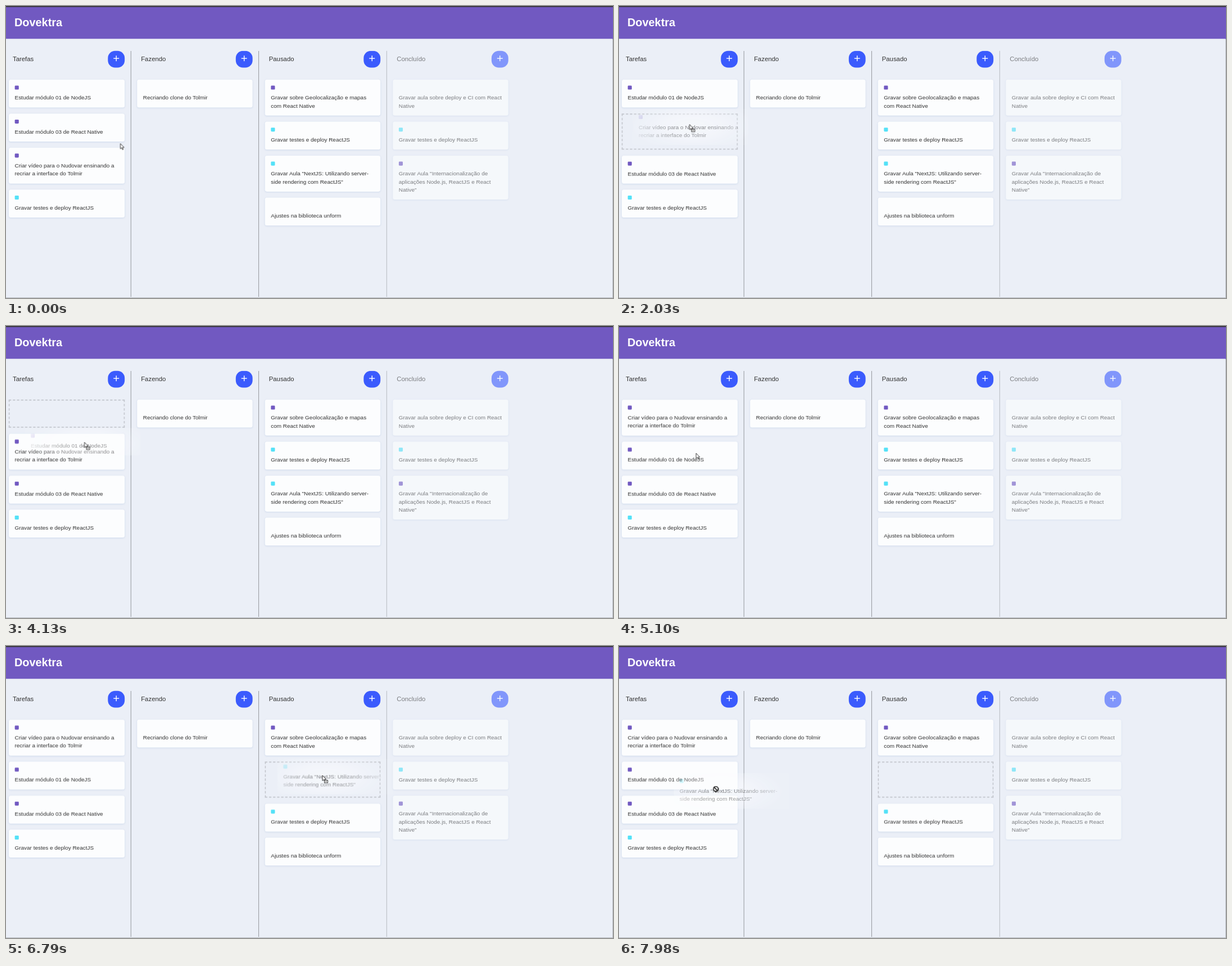
An HTML page for the animation above (8000 ms loop, 1080x519 px).

```html
<!DOCTYPE html>
<html lang="pt-BR">
<head>
<meta charset="utf-8">
<title>Quadro de tarefas</title>
<style>
  * { box-sizing: border-box; margin: 0; }
  html, body { width: 100%; height: 100%; overflow: hidden; background: #ebeff7; }
  body { position: relative; font-family: "Liberation Sans", Arial, sans-serif; color: #333; }

  /* The board is laid out at full size and shown at 71.1% */
  .board { position: absolute; left: 0; top: .3px; width: 1519px; height: 730px;
    transform: scale(.711); transform-origin: 0 0; }
  header { position: absolute; top: -1px; width: 100%; height: 83px; padding-left: 21px;
    background: #7159c1; color: #fff; font: bold 28px/85px "Liberation Sans", Arial, sans-serif; }
  .edge { position: absolute; inset: 0; border: solid #b4b8be; border-width: 0 1px 1px 0; }
  .edge::before { content: ""; position: absolute; left: 0; right: -1px; top: 0; height: 1.5px; background: #3d3a45; }
  .edge::after { content: ""; position: absolute; right: -1px; top: 1.5px; width: 1px; height: 57px; background: #7159c1; }

  .col { position: absolute; left: calc(-8.2px + 320px * var(--n)); top: 112px; width: 320px; height: 615px; padding: 0 15px; }
  .col + .col { border-left: 1px solid rgba(0, 0, 0, .52); }
  .done { opacity: .6; }
  h2 { height: 42px; margin-bottom: 30px; padding-left: 10px; font-size: 16px; font-weight: 400; line-height: 41px; position: relative; }
  .add { position: absolute; right: 0; top: 0; width: 42px; height: 42px; border-radius: 18px; background: #3b5bfd; }
  .add::before, .add::after { content: ""; position: absolute; background: #fff; left: 14px; top: 18px; width: 14px; height: 2px; }
  .add::after { transform: rotate(90deg); }

  .card { position: relative; margin-bottom: 15px; }
  .face { padding: 15px; border-radius: 5px; background: #fcfdfe; box-shadow: 0 1px 4px rgba(192, 208, 230, .8); }
  .face i { display: block; width: 10px; height: 10px; margin-bottom: 10px; border-radius: 2px; }
  .face p { font-size: 14px; line-height: 20px; white-space: nowrap; }
  .purple { background: #7159c1; }
  .cyan { background: #54e1f7; }
  .slot { position: absolute; inset: 0; border: 2px dashed rgba(0, 0, 0, .2); }

  #pointer { position: absolute; left: 0; top: 0; animation: move 8s linear infinite; }
  #pointer svg { position: absolute; left: 0; top: 0; overflow: visible; }
  .ghost { position: absolute; left: 0; top: 0; width: 290px; transform-origin: 0 0;
    transform: scale(.711) translate(calc(-1 * var(--x)), calc(-1 * var(--y))); }
  .ghost .face { box-shadow: none;
    mask-image: radial-gradient(155px 62px at calc(var(--x) + 14px) calc(var(--y) + 10px),
      rgba(0, 0, 0, .62), rgba(0, 0, 0, .42) 50%, rgba(0, 0, 0, .08)); }

  .slot, .ghost, .lift .face, .shift, .arrow, .drop, .stop { animation: 8s step-end infinite; }
  .a .slot, .ghost.a { animation-name: holdA; }
  .b .slot, .ghost.b { animation-name: holdB; }
  .c .slot, .ghost.c { animation-name: holdC; }
  .lift.a .face { animation-name: freeA; }
  .lift.b .face { animation-name: freeB; }
  .lift.c .face { animation-name: freeC; }
  .up { animation-name: up; }
  .down1 { animation-name: down1; }
  .down2 { animation-name: down2; }
  .down3 { animation-name: down3; }
  .up3 { animation-name: up3; }
  .arrow { animation-name: arrow; }
  .drop { animation-name: drop; }
  .stop { animation-name: stop; }

  @keyframes holdA { 0%, 29.5%, 100% { opacity: 0 } 13.125% { opacity: 1 } }
  @keyframes holdB { 0%, 60.875%, 100% { opacity: 0 } 46% { opacity: 1 } }
  @keyframes holdC { 0% { opacity: 0 } 75.25%, 100% { opacity: 1 } }
  @keyframes freeA { 0%, 29.5%, 100% { opacity: 1 } 13.125% { opacity: 0 } }
  @keyframes freeB { 0%, 60.875%, 100% { opacity: 1 } 46% { opacity: 0 } }
  @keyframes freeC { 0% { opacity: 1 } 75.25%, 100% { opacity: 0 } }

  @keyframes up { 0% { transform: none } 23.25% { transform: translateY(-85px) } 55.3%, 100% { transform: translateY(-170px) } }
  @keyframes down1 { 0% { transform: none } 55.3%, 100% { transform: translateY(105px) } }
  @keyframes down2 { 0% { transform: none } 23.25%, 100% { transform: translateY(105px) } }
  @keyframes down3 { 0% { transform: none } 83.8%, 100% { transform: translateY(105px) } }
  @keyframes up3 { 0% { transform: none } 83.8%, 100% { transform: translateY(-85px) } }

  @keyframes arrow { 0%, 29.5%, 61.375% { opacity: 1 } 13.125%, 46%, 75.25%, 100% { opacity: 0 } }
  @keyframes drop { 0%, 29.5%, 61.375%, 94.7%, 100% { opacity: 0 } 13.125%, 46%, 75.25% { opacity: 1 } }
  @keyframes stop { 0% { opacity: 0 } 94.7%, 100% { opacity: 1 } }

  @keyframes move {
    0%, .625% { transform: translate(203.5px, 244.5px) }
    3% { transform: translate(175px, 258px) }
    7.125%, 13.125% { transform: translate(126px, 282px) }
    15.125% { transform: translate(127.5px, 265.5px) }
    18% { transform: translate(128px, 245px) }
    22.875% { transform: translate(121.5px, 218px) }
    23.25% { transform: translate(121px, 216px) }
    25.375%, 35.625% { transform: translate(120.5px, 206.5px) }
    39% { transform: translate(120px, 185px) }
    43.125%, 46% { transform: translate(131.5px, 159px) }
    51.625% { transform: translate(134.5px, 202.5px) }
    55.375%, 56.125% { transform: translate(136.5px, 224.5px) }
    57.25%, 63.75% { transform: translate(137px, 226px) }
    65% { transform: translate(150px, 238px) }
    66.5% { transform: translate(240px, 290px) }
    68% { transform: translate(400px, 345px) }
    69.5% { transform: translate(510px, 369px) }
    70.5% { transform: translate(550px, 345px) }
    71.5%, 75.25% { transform: translate(555px, 299px) }
    76.5% { transform: translate(556px, 286px) }
    80% { transform: translate(557px, 250px) }
    84.875%, 91.375% { transform: translate(558px, 226px) }
    94% { transform: translate(500px, 236px) }
    97% { transform: translate(330px, 250px) }
    99.75%, 100% { transform: translate(172.5px, 251.5px) }
  }
</style>
</head>
<body>
<div class="board">
  <header>Dovektra</header>

  <section class="col" style="--n:0">
    <h2>Tarefas<span class="add"></span></h2>
    <div class="card lift b shift down1"><div class="face"><i class="purple"></i><p>Estudar módulo 01 de NodeJS</p></div><div class="slot"></div></div>
    <div class="card shift down2"><div class="face"><i class="purple"></i><p>Estudar módulo 03 de React Native</p></div></div>
    <div class="card lift a shift up"><div class="face"><i class="purple"></i><p>Criar vídeo para o Nudovar ensinando a<br>recriar a interface do Tolmir</p></div><div class="slot"></div></div>
    <div class="card"><div class="face"><i class="cyan"></i><p>Gravar testes e deploy ReactJS</p></div></div>
  </section>

  <section class="col" style="--n:1">
    <h2>Fazendo<span class="add"></span></h2>
    <div class="card"><div class="face"><i></i><p>Recriando clone do Tolmir</p></div></div>
  </section>

  <section class="col" style="--n:2">
    <h2>Pausado<span class="add"></span></h2>
    <div class="card"><div class="face"><i class="purple"></i><p>Gravar sobre Geolocalização e mapas<br>com React Native</p></div></div>
    <div class="card shift down3"><div class="face"><i class="cyan"></i><p>Gravar testes e deploy ReactJS</p></div></div>
    <div class="card lift c shift up3"><div class="face"><i class="cyan"></i><p>Gravar Aula "NextJS: Utilizando server-<br>side rendering com ReactJS"</p></div><div class="slot"></div></div>
    <div class="card"><div class="face"><i></i><p>Ajustes na biblioteca unform</p></div></div>
  </section>

  <section class="col done" style="--n:3">
    <h2>Concluído<span class="add"></span></h2>
    <div class="card"><div class="face"><i></i><p>Gravar aula sobre deploy e CI com React<br>Native</p></div></div>
    <div class="card"><div class="face"><i class="cyan"></i><p>Gravar testes e deploy ReactJS</p></div></div>
    <div class="card"><div class="face"><i class="purple"></i><p>Gravar Aula "Internacionalização de<br>aplicações Node.js, ReactJS e React<br>Native"</p></div></div>
  </section>
</div>
<div class="edge"></div>

<div id="pointer">
  <div class="ghost a" style="--x:135.3px;--y:33px"><div class="face"><i class="purple"></i><p>Criar vídeo para o Nudovar ensinando a<br>recriar a interface do Tolmir</p></div></div>
  <div class="ghost b" style="--x:142.3px;--y:30.8px"><div class="face"><i class="purple"></i><p>Estudar módulo 01 de NodeJS</p></div></div>
  <div class="ghost c" style="--x:106px;--y:36.3px"><div class="face"><i class="cyan"></i><p>Gravar Aula "NextJS: Utilizando server-<br>side rendering com ReactJS"</p></div></div>
  <svg width="1" height="1" fill="#fff" stroke="#222" stroke-width=".9">
    <defs><path id="tip" d="M0 0V9.4L2.2 7.4L3.8 10.9L5.2 10.3L3.7 6.9H6.6Z"/></defs>
    <use class="arrow" href="#tip"/>
    <g class="drop">
      <use href="#tip" x="5" y="4"/>
      <path d="M8.5 12.5h6v4.6h-6zM10 14.8h3"/>
    </g>
    <g class="stop" fill="none" stroke="#111" stroke-width="1.6">
      <circle cx="-.3" cy="2.6" r="4.3" fill="#fff"/>
      <path d="M-3.3 -.4L2.7 5.6"/>
    </g>
  </svg>
</div>
</body>
</html>
```
